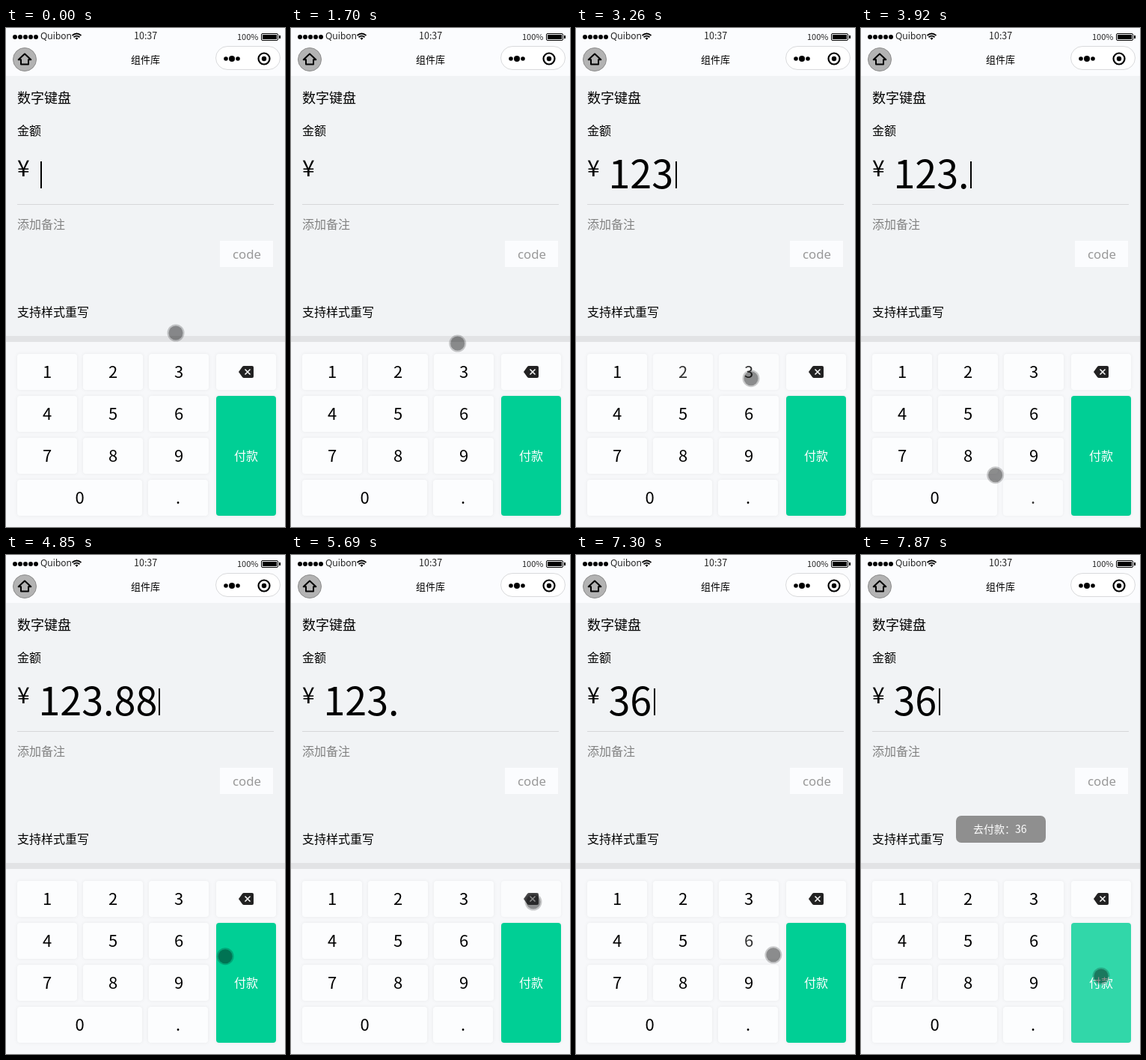
Recreate the animation shown at these times as an HTML page. Size 373 px wide and 666 px high, loop 7.99 s.

```html
<!DOCTYPE html>
<html lang="zh-CN">
<head>
<meta charset="utf-8">
<title>数字键盘</title>
<style>
  html, body { margin: 0; width: 100%; height: 100%; overflow: hidden; background: #f1f3f5; }
  svg { display: block; width: 100%; height: 100%; }
  text { font-family: "Noto Sans CJK SC", "Noto Sans CJK", "Noto Sans", sans-serif; font-size: 16px; }
  .latin { font-family: "Noto Sans", "Open Sans", sans-serif; }
  .key rect { fill: #fcfdfe; filter: drop-shadow(0 0 2px rgba(0, 0, 0, .06)); }
  .key text { font-size: 22px; text-anchor: middle; }
  .key.pay rect { fill: #00cf95; }
  .key.pay text { font-size: 16px; fill: #fff; }
  .pressed { opacity: .8; }
</style>
</head>
<body>
<svg viewBox="0 0 373 666">
  <rect width="373" height="666" fill="#f1f3f5"/>
  <rect width="373" height="64" fill="#fbfcfe"/>

  <!-- status bar -->
  <path d="M12 12h29" stroke="#000" stroke-width="6" stroke-linecap="round" stroke-dasharray="0 7"/>
  <text class="latin" x="46" y="15" style="font-size:12px" fill="#222">Quibon</text>
  <g fill="none" stroke="#000" stroke-width="1.8">
    <path d="M88.5 10q6-5 12 0M90.5 12.3q4-3.4 8 0"/>
    <path d="M92.5 13.5q2-1.6 4 0l-2 2.5z" fill="#000" stroke="none"/>
  </g>
  <text x="171" y="15" style="font-size:12.5px" fill="#222">10:37</text>
  <text x="309" y="16" style="font-size:11px" fill="#222">100%</text>
  <rect x="341.5" y="7.5" width="22" height="9" rx="1.5" fill="none" stroke="#000"/>
  <path d="M343 9h19v6h-19zM365 10h2v4h-2z"/>

  <!-- navigation bar -->
  <circle cx="25" cy="42" r="15.5" fill="#b3b3b3" stroke="#8c8c8c"/>
  <path d="M25 34.5l-8.3 7.8h3.3v6.2h10v-6.2h3.3z" fill="none" stroke="#000" stroke-width="2" stroke-linejoin="round"/>
  <text x="167" y="46.5" style="font-size:13px">组件库</text>
  <rect x="280.5" y="24.5" width="86" height="31" rx="15.5" fill="#fff" stroke="#d9dadc"/>
  <circle cx="294" cy="41" r="2.8"/><circle cx="302" cy="41" r="4"/><circle cx="310" cy="41" r="2.8"/>
  <circle cx="345" cy="41" r="7.5" fill="none" stroke="#000" stroke-width="2.2"/>
  <circle cx="345" cy="41" r="3.2"/>

  <!-- form -->
  <text x="15" y="100" style="font-size:18px">数字键盘</text>
  <text x="15" y="143">金额</text>
  <text x="15" y="198" style="font-size:30px">¥</text>
  <text id="amount" x="43.5" y="213.5" style="font-size:52px"></text>
  <rect id="caret" y="178" width="2" height="36"/>
  <path d="M15 235.5h343" stroke="#d6d7d9"/>
  <text x="15" y="267.5" fill="#808080">添加备注</text>
  <rect x="286" y="284" width="71" height="35" fill="#fbfcfe"/>
  <text class="latin" x="303" y="308" style="font-size:16.8px" fill="#999">code</text>
  <text x="15" y="384.5">支持样式重写</text>

  <!-- keyboard -->
  <rect y="411" width="373" height="8" fill="#e2e3e5"/>
  <rect y="419" width="373" height="247" fill="#f7f8fa"/>
  <g id="keys"></g>

  <g id="toast">
    <rect x="127" y="348" width="120" height="36" rx="7" fill="#8f8f8f"/>
    <text x="150" y="371" style="font-size:14px;font-weight:500" fill="#fff">去付款：36</text>
  </g>
  <g id="pointer">
    <circle r="11.5" fill-opacity=".2"/>
    <circle r="9.5" fill-opacity=".3"/>
  </g>
</svg>
<script>
const LOOP = 7990;
const STAY = 140;       // the pointer rests on a key this long, then taps it
const HIGHLIGHT = 420;  // a tapped key stays pale this long
const $ = id => document.getElementById(id);

const keys = {};
function addKey(name, x, y, w, h, content) {
  const cx = x + w / 2, cy = y + h / 2;
  const label = content || `<text x="${cx}" y="${cy + 8}">${name}</text>`;
  $('keys').insertAdjacentHTML('beforeend',
    `<g class="key ${name}"><rect x="${x}" y="${y}" width="${w}" height="${h}" rx="4"/>${label}</g>`);
  keys[name] = { cx, cy, node: $('keys').lastElementChild };
}
for (let n = 0; n < 9; n++) addKey(n + 1, 15 + n % 3 * 88, 435 + Math.floor(n / 3) * 56, 80, 48);
addKey('0', 15, 603, 167, 48);
addKey('.', 190, 603, 80, 48);
addKey('del', 281, 435, 80, 48,
  '<path d="M311 459l5-7q1-1 2-1h11q2 0 2 2v12q0 2-2 2h-11q-1 0-2-1z" fill="#222"/>' +
  '<path d="M319.5 455.5l7 7m0-7l-7 7" stroke="#fff" stroke-width="1.5"/>');
addKey('pay', 281, 491, 80, 160, '<text x="321" y="577">付款</text>');
keys.clear = keys.del;

// Arrivals of the pointer, on a key or at a point passed on the way
const tap = (time, key) => ({ time, key, x: keys[key].cx + 3, y: keys[key].cy + 4 });
const pass = (time, x, y) => ({ time, x, y });
const stops = [
  pass(0, 227, 407), pass(1560, 227, 407), pass(1700, 223, 421),
  tap(2260, '1'), tap(2715, '2'), tap(3110, '3'), tap(3640, '.'), tap(4010, '8'), tap(4270, '8'),
  pass(4850, 293, 536), tap(5110, 'del'), tap(5250, 'del'), tap(5900, 'clear'),
  pass(6480, 267, 476), tap(6620, '3'), tap(7010, '6'), { ...tap(7590, 'pay'), x: 321, y: 562 }
];
const tapTime = stop => stop.time + STAY;

function pointerAt(t) {
  const i = stops.findLastIndex(s => s.time <= t);
  const from = stops[i], to = stops[i + 1] || from;
  const leave = from.key ? tapTime(from) : from.time;
  const k = t <= leave || to === from ? 0 : (t - leave) / (to.time - leave);
  return [from.x + (to.x - from.x) * k, from.y + (to.y - from.y) * k];
}

function edit(amount, key) {
  if (key === 'pay') return amount;
  if (key === 'clear') return '';
  return key === 'del' ? amount.slice(0, -1) : amount + key;
}

function draw(t) {
  const taps = stops.filter(s => s.key && tapTime(s) <= t);
  const amount = taps.reduce((text, s) => edit(text, s.key), '');
  $('amount').textContent = amount;

  const dots = amount.includes('.') ? 1 : 0;
  $('caret').setAttribute('x', 46 + (amount.length - dots) * 29 + dots * 13);
  const blink = t % 1000;
  $('caret').style.display = blink >= 340 && blink < 800 ? 'none' : '';

  const pale = taps.filter(s => t < tapTime(s) + HIGHLIGHT).map(s => keys[s.key]);
  for (const key of Object.values(keys)) key.node.classList.toggle('pressed', pale.includes(key));

  const paid = taps.find(s => s.key === 'pay');
  $('toast').style.display = paid && t >= tapTime(paid) + 120 ? '' : 'none';
  $('pointer').setAttribute('transform', `translate(${pointerAt(t)})`);
}

const start = performance.now();
function tick() {
  draw((performance.now() - start) % LOOP);
  requestAnimationFrame(tick);
}
tick();
</script>
</body>
</html>
```
